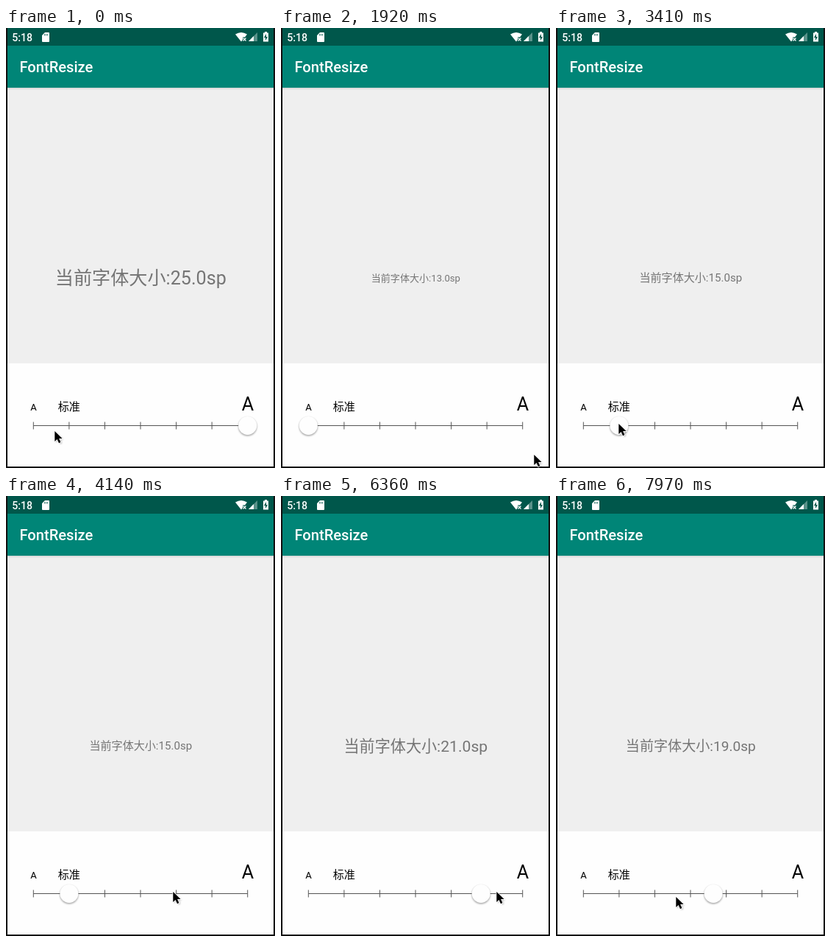
An HTML page that plays this animation: 366x597 px, repeating every 8 s.

```html
<!DOCTYPE html>
<html lang="zh">
<head>
<meta charset="utf-8">
<title>FontResize</title>
<style>
  html, body { margin: 0; width: 100%; height: 100%; overflow: hidden; background: #111; }
  svg { display: block; width: 366px; height: 597px; }
  text { font-family: Roboto, "Noto Sans CJK SC", "Noto Sans CJK", sans-serif; }
  .mid { text-anchor: middle; }
  .bold { font-weight: 500; fill: #fff; }
</style>
</head>
<body>
<svg viewBox="0 0 366 597">
  <defs>
    <filter id="soft" x="-30%" y="-30%" width="160%" height="160%">
      <feGaussianBlur stdDeviation="1.2"/>
    </filter>
    <linearGradient id="shade" x2="0" y2="1">
      <stop offset="0" stop-opacity=".12"/>
      <stop offset="1" stop-opacity="0"/>
    </linearGradient>
  </defs>

  <rect width="366" height="597" fill="#111"/>
  <rect x="2" width="362" height="24" fill="#00574b"/>
  <rect x="2" y="81" width="362" height="374" fill="#efefef"/>
  <rect x="2" y="24" width="362" height="57" fill="#008577"/>
  <rect x="2" y="81" width="362" height="3" fill="url(#shade)"/>
  <rect x="2" y="455" width="362" height="140" fill="#fefefe"/>

  <text class="bold" x="8.2" y="17.5" font-size="14.08">5:18</text>
  <text class="bold" x="18.5" y="60" font-size="20.11">FontResize</text>

  <g fill="#fff">
    <path d="M53 6h5q1 0 1 1v11q0 1-1 1h-8q-1 0-1-1v-8z"/>
    <path d="M312 8.500q8-5 16 0l-3 4h-3v3.500l-2 2.500z"/>
    <path d="M342 6v12h-12z" opacity=".35"/>
    <path d="M337 11v7h-7z"/>
    <path d="M352 6.500v-1.500h3v1.500h2v12h-7v-12z"/>
  </g>
  <path d="M52.500 8v2.500M54.500 8v2.500M56.500 8v2.500" stroke="#00574b" stroke-width=".8"/>
  <path d="M322.500 13.500l4 4m0-4l-4 4" stroke="#fff" stroke-width="1.2"/>
  <path d="M354 8l-3 5h2v4l3-5h-2z" fill="#00574b"/>

  <text id="label" class="mid" x="183.3" fill="#757575"></text>
  <text class="mid" x="37.5" y="519" font-size="13.07">A</text>
  <text class="mid" x="85.8" y="518.8" font-size="15.08">标准</text>
  <text class="mid" x="328.9" y="519.4" font-size="25.14">A</text>

  <path id="scale" fill="none" stroke="#555"/>
  <g id="knob">
    <circle cy="1.2" r="12.7" opacity=".34" filter="url(#soft)"/>
    <circle r="12.5" fill="#fefefe"/>
  </g>
  <g id="cursor">
    <path d="M1.500 1.500v14l3.500-3 2.500 5 2.500-1-2.500-5h4.500z" opacity=".3" filter="url(#soft)"/>
    <path d="M0 0v14l3.300-3 2.400 5.200 2.400-1.100-2.300-5h4.500z" stroke="#fff" stroke-width="1.6" paint-order="stroke"/>
  </g>
</svg>
<script>
const LOOP = 8000, BEAT = 147.7, LEAD = 9;
const LEFT = 37.3, STEP = 48.57, STOPS = 6, TRACK_Y = 539.5, SP = 362 / 360;
const $ = id => document.getElementById(id);
const label = $('label'), knob = $('knob'), cursor = $('cursor');

// Pointer path: [beat, x, y], straight between points
const path = [
  [0, 67, 547], [3, 12, 548], [6, 322, 578], [7.5, 340, 620], [9, 344, 578],
  [11.5, 380, 586], [13, 345, 579], [16, 327, 538], [18, 158, 533], [20, 158, 533],
  [23, 86, 537], [27, 221, 537], [28, 228, 537], [30, 228, 537], [33, 138, 537],
  [35, 138, 537], [39, 200, 537], [42, 268, 537], [43, 294, 537], [44, 346, 541],
  [47, 28, 546], [48, 24.5, 545], [49, 203, 543], [50, 343, 544], [51, 343, 544],
  [54, 164, 544]
];
// Taps snap the knob to the nearest stop; later it is dragged, a little behind
const taps = [2, 16, 20, 23, 30, 35, 39];
const DRAG = 42, LAG = 0.84;

const stopX = i => LEFT + i * STEP;
const clamp = (v, lo, hi) => Math.min(hi, Math.max(lo, v));
const move = (el, x, y) => el.setAttribute('transform', `translate(${x} ${y})`);

function pointer(beat) {
  const i = path.findIndex(p => p[0] >= beat);
  if (i < 1) return path.at(i).slice(1);
  const [b0, x0, y0] = path[i - 1], [b1, x1, y1] = path[i];
  const k = (beat - b0) / (b1 - b0);
  return [x0 + (x1 - x0) * k, y0 + (y1 - y0) * k];
}

function knobX(beat) {
  if (beat >= DRAG) return clamp(pointer(beat - LAG)[0], LEFT, stopX(STOPS));
  const tap = taps.findLast(b => b <= beat);
  if (tap === undefined) return stopX(STOPS);
  return stopX(clamp(Math.round((pointer(tap)[0] - LEFT) / STEP), 0, STOPS));
}

let scale = `M${LEFT} ${TRACK_Y}H${stopX(STOPS)}`;
for (let i = 0; i <= STOPS; i++) scale += `M${stopX(i)} 534.5v10`;
$('scale').setAttribute('d', scale);

function draw() {
  const beat = Math.floor((performance.now() % LOOP + LEAD) / BEAT);
  const x = knobX(beat), [px, py] = pointer(beat);
  const size = 13 + 2 * Math.floor((x - LEFT) / STEP + 0.02);
  move(knob, x, TRACK_Y);
  move(cursor, px - 0.7, py);
  label.textContent = `当前字体大小:${size.toFixed(1)}sp`;
  label.setAttribute('font-size', size * SP);
  label.setAttribute('y', 338.7 + size * 0.375);
  requestAnimationFrame(draw);
}
draw();
</script>
</body>
</html>
```
